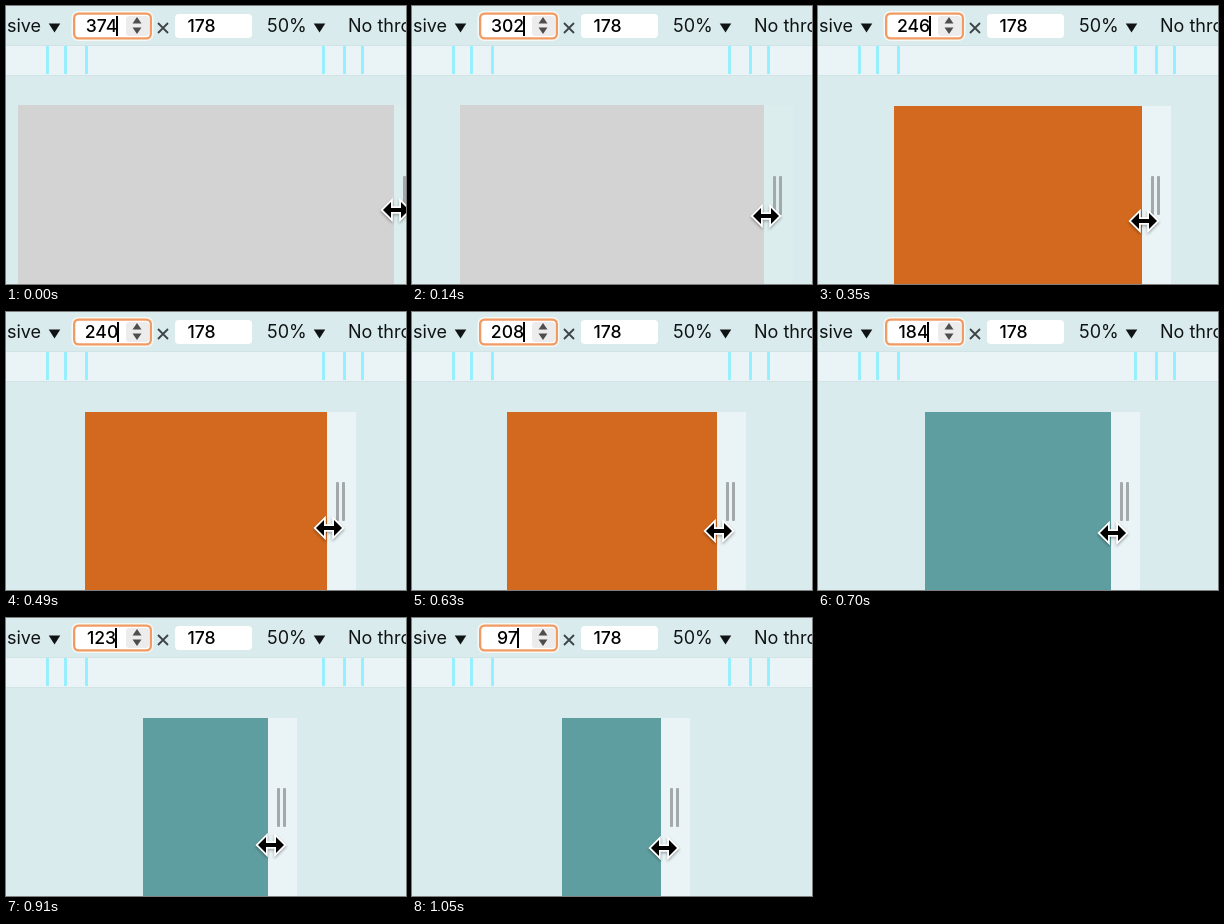
An HTML page with a canvas for the animation above (1120 ms loop, 400 px wide and 278 px high).

```html
<!DOCTYPE html>
<html lang="en">
<head>
<meta charset="utf-8">
<title>Responsive resize</title>
<style>
html, body { margin: 0; width: 100%; height: 100%; overflow: hidden; background: #d9ebed; }
canvas { display: block; }
</style>
</head>
<body>
<canvas id="stage"></canvas>
<script>
const canvas = document.getElementById('stage');
const ctx = canvas.getContext('2d');
const W = 400, H = 278, STEP = 70, STEPS = 16;
const MID = 199.5;
const dpr = window.devicePixelRatio || 1;
canvas.width = W * dpr;
canvas.height = H * dpr;
canvas.style.width = W + 'px';
canvas.style.height = H + 'px';

// The dragged width at a few steps; everything else follows from it.
const drag = [[0, 374], [2, 302], [3, 251], [7, 240], [9, 208], [12, 136], [15, 97]];

function widthAt(step) {
  const i = drag.findIndex(([s]) => s >= step);
  if (i === 0) return drag[0][1];
  const [s0, w0] = drag[i - 1], [s1, w1] = drag[i];
  return Math.round(w0 + (w1 - w0) * (step - s0) / (s1 - s0));
}

function paneColor(width) {
  if (width > 300) return '#d3d3d3';
  return width > 200 ? '#d2691e' : '#5f9ea0';
}

function rect(x, y, w, h, color) {
  ctx.fillStyle = color;
  ctx.fillRect(x, y, w, h);
}

function rounded(x, y, w, h, r, color) {
  ctx.beginPath();
  ctx.roundRect(x, y, w, h, r);
  ctx.fillStyle = color;
  ctx.fill();
}

function path(points) {
  ctx.beginPath();
  points.forEach(([x, y]) => ctx.lineTo(x, y));
  ctx.closePath();
}

function triangle(x, y, w, h, color) {
  path([[x - w / 2, y], [x + w / 2, y], [x, y + h]]);
  ctx.fillStyle = color;
  ctx.fill();
}

function text(str, x, align, font, color) {
  ctx.font = font + ' Inter, "Liberation Sans", sans-serif';
  ctx.textAlign = align;
  ctx.fillStyle = color;
  ctx.fillText(str, x, 26);
  return ctx.measureText(str).width;
}

const label = (str, x, align = 'left') => text(str, x, align, '18px', '#101314');
const value = (str, x, align = 'left') => text(str, x, align, '500 17.6px', '#000');

function mediaBar() {
  rect(0, 39, W, 31, '#d2e3e6');
  rect(0, 40, W, 29, '#eaf4f7');
  for (const offset of [118.5, 139.5, 157.5]) {
    for (const side of [-1, 1]) rect(199 + side * offset - 1.4, 40, 2.8, 28, '#90f0ff');
  }
}

function widthField(width) {
  rounded(65.5, 5, 82, 30, 7, '#f6f8f6');
  rounded(67, 6.5, 79, 27, 5.5, '#f19b62');
  rounded(69.3, 8.8, 74.4, 22.4, 3.5, '#fff');
  rounded(120, 10, 23, 20, 3, '#ececec');
  triangle(131, 17.5, 9, -6.5, '#4d4d4d');
  triangle(131, 21.5, 9, 6.5, '#4d4d4d');
  const w = value(String(width), 95.5, 'center');
  rect(Math.round(94.5 + w / 2), 10, 2, 20, '#000');
}

function cross(x, y, r) {
  ctx.strokeStyle = '#3c4446';
  ctx.lineWidth = 1.8;
  ctx.beginPath();
  for (const s of [-1, 1]) {
    ctx.moveTo(x - r, y - r * s);
    ctx.lineTo(x + r, y + r * s);
  }
  ctx.stroke();
}

function toolbar(width) {
  label('Responsive', 35, 'right');
  triangle(48.5, 17.5, 11.5, 9, '#101314');
  widthField(width);
  cross(157, 22, 5);
  rounded(169, 8, 77, 24, 4, '#fff');
  value('178', 181.5);
  label('50%', 261);
  triangle(313.5, 17.5, 11.5, 9, '#101314');
  label('No throttling', 342);
}

function pane(width) {
  const half = width / 2 + 1;
  const left = Math.round(MID - half), right = Math.round(MID + half);
  const wide = width > 300, top = wide ? 99 : 100;
  const grip = Math.floor(MID + half + 9.5);
  rect(right, top, grip + 20 - right, H, wide ? '#dcedee' : '#eaf4f7');
  rect(left, top, right - left, H, paneColor(width));
  for (const x of [grip, grip + 6]) rounded(x, 170, 3, 39, 1, '#a3a8aa');
}

function pointer(width) {
  const u = (width - 97) / 277;
  ctx.save();
  ctx.translate(Math.round(MID + width / 2 + 3.5), Math.round(230 - 30 * u + 4 * u * u));
  path([[-13, 0], [-5, -8], [-5, -2], [5, -2], [5, -8],
        [13, 0], [5, 8], [5, 2], [-5, 2], [-5, 8]]);
  ctx.lineWidth = 3.6;
  ctx.strokeStyle = '#fff';
  ctx.shadowColor = 'rgba(0,0,0,.35)';
  ctx.shadowBlur = 3 * dpr;
  ctx.shadowOffsetY = 1.5 * dpr;
  ctx.stroke();
  ctx.shadowColor = 'transparent';
  ctx.fillStyle = '#000';
  ctx.fill();
  ctx.restore();
}

function draw(step) {
  const width = widthAt(step);
  ctx.setTransform(dpr, 0, 0, dpr, 0, 0);
  rect(0, 0, W, H, '#d9ebed');
  mediaBar();
  toolbar(width);
  pane(width);
  pointer(width);
}

const start = performance.now();

function tick(now) {
  draw(Math.floor(Math.max(0, now - start) / STEP) % STEPS);
  requestAnimationFrame(tick);
}

tick(start);
</script>
</body>
</html>
```
